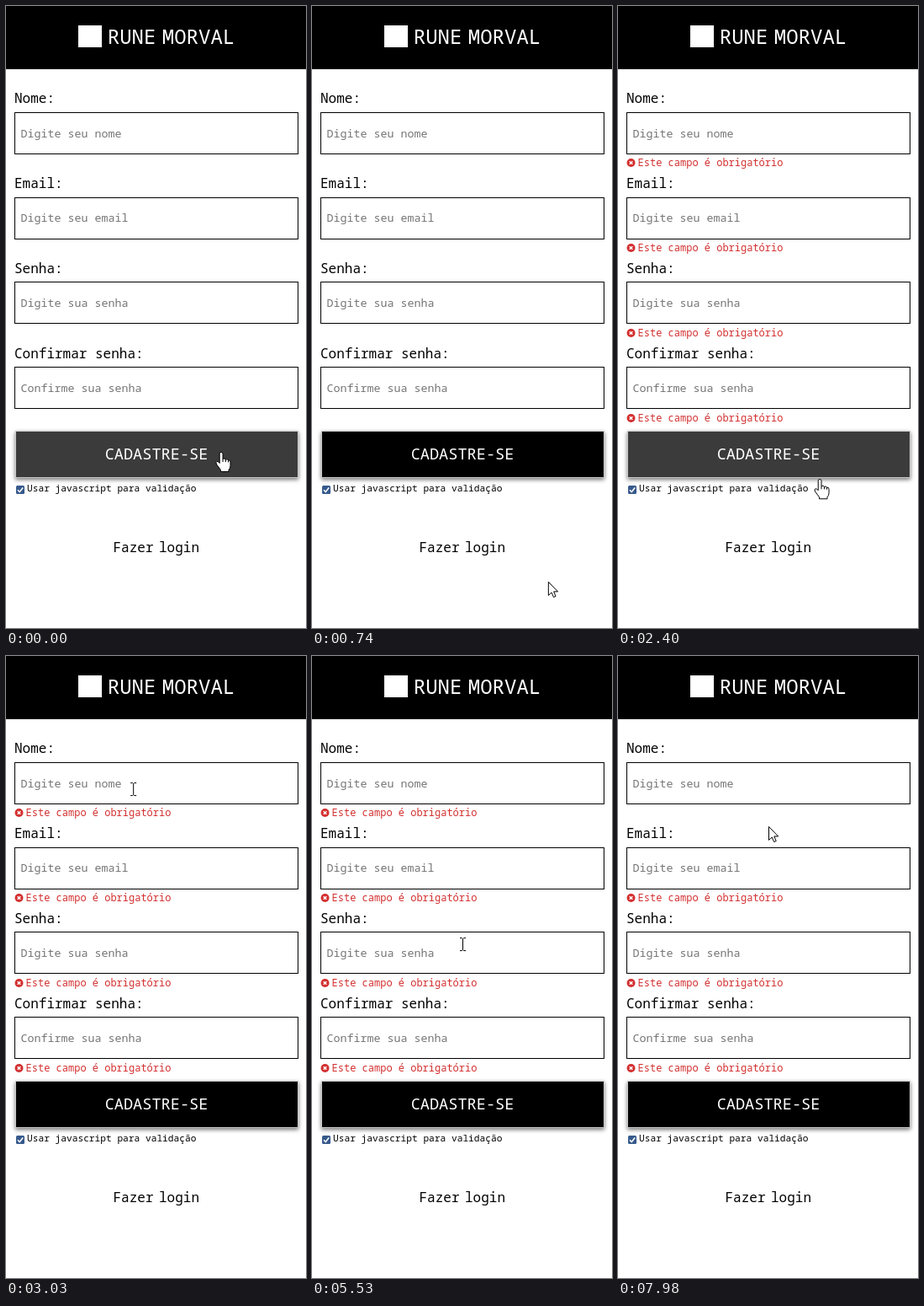
Write an HTML page that moves like this. It is 357 px wide and 738 px high and loops after 8000 ms.

```html
<!DOCTYPE html>
<html lang="pt-BR">
<head>
<meta charset="utf-8">
<title>Cadastro</title>
<style>
  html, body { margin: 0; width: 100%; height: 100%; overflow: hidden; background: #fff; }
  svg { display: block; width: 100%; height: 100%; }
  text { font: 16px "Noto Sans Mono", "DejaVu Sans Mono", monospace; white-space: pre; }
  .title { font-size: 24px; font-weight: 300; fill: #fff; }
  .hint { font-size: 13.333px; fill: #757575; }
  .error { font-size: 12px; fill: #d32f2f; }
  .action { font-size: 18.6px; fill: #fff; text-anchor: middle; }
  .small { font-size: 11.2px; }
  .box { fill: #fff; stroke: #000; }
  #button { stroke: #c8c8c8; filter: drop-shadow(0 2px 2.5px rgba(0, 0, 0, .55)); }
  #cursor path { stroke-linejoin: round; }
</style>
</head>
<body>
<svg viewBox="0 0 357 738">
  <rect width="357" height="75"/>
  <rect x="86" y="23" width="28" height="26" fill="#fff"/>
  <text class="title" x="120.8" y="45">RUNE</text>
  <text class="title" x="185.8" y="45">MORVAL</text>
  <g id="form"></g>
  <path id="caret" d="M18.5 143.5v16" stroke="#000"/>
  <rect id="button" x="11.5" y="504.5" width="336" height="55"/>
  <text class="action" x="179" y="538">CADASTRE-SE</text>
  <rect x="12" y="569" width="10" height="10" rx="1.5" fill="#375a8c"/>
  <path d="M14 574.2l2.2 2.3 4-5" fill="none" stroke="#fff" stroke-width="1.5"/>
  <text class="small" x="25" y="576">Usar javascript para validação</text>
  <text x="127.5" y="648">Fazer</text>
  <text x="182" y="648">login</text>
  <g id="cursor">
    <path id="arrow" fill="#fff" stroke="#000" d="M.5 .5V16.5L4.2 13L6.7 18.6L9.2 17.5L6.8 12H11.7Z"/>
    <g id="beam" fill="none">
      <path stroke="#fff" stroke-width="3" d="M-3.5-7.5h7M0-7.5v15M-3.5 7.5h7"/>
      <path stroke="#000" d="M-3.5-7.5h2.5l1 1 1-1h2.5M0-6.5v13M-3.5 7.5h2.5l1-1 1 1h2.5"/>
    </g>
    <path id="hand" fill="#fff" stroke="#000"
      d="M-1.8 13.5V2.2a1.9 1.9 0 0 1 3.8 0V8.5q2-1.5 3.4.6q2-1 3.1.8q2.4-.5 2.5 2V16.5q0 3-2 5V23.5H-.5V21.5L-5.3 15q-1.7-2.8.3-3.6q1.4-.3 3.2 2.1zM2 8.5v3.5M5.4 9.1v3M8.5 9.9v2.5"/>
  </g>
</svg>
<script>
const LOOP = 8000, PITCH = 100.8;
const SUBMIT = 2190, FOCUS = 7300, BLUR = 7840;
const $ = id => document.getElementById(id);

const fields = [
  ['Nome:', 'Digite seu nome'],
  ['Email:', 'Digite seu email'],
  ['Senha:', 'Digite sua senha'],
  ['Confirmar senha:', 'Confirme sua senha']
];
const fieldTop = i => Math.floor(126.3 + i * PITCH);

$('form').innerHTML = fields.map(([label, hint], i) => {
  const down = Math.ceil(i * PITCH);
  return `<text x="10" y="${115 + down}">${label}</text>
    <rect class="box" x="10.5" y="${fieldTop(i) + .5}" width="337" height="49"/>
    <text class="hint" x="17.5" y="${156 + Math.floor(i * PITCH)}">${hint}</text>
    <g class="note" transform="translate(0 ${down})">
      <circle cx="15.5" cy="186" r="5" fill="#d32f2f"/>
      <path d="M13.7 184.2l3.6 3.6m0-3.6l-3.6 3.6" stroke="#fff" stroke-width="1.5"/>
      <text class="error" x="23.6" y="190">Este campo é obrigatório</text>
    </g>`;
}).join('');
const notes = [...document.querySelectorAll('.note')];

// Turning points of the pointer: time, x, y
const route = [
  [0, 256, 529], [69, 256, 529], [200, 258, 430], [340, 340, 760],
  [600, 293, 722], [740, 281, 683], [1230, 206, 612], [1440, 236, 549],
  [1640, 234, 558], [SUBMIT, 234, 558], [2400, 240, 562], [2890, 253, 195],
  [3810, 253, 195], [3880, 256, 142], [4020, 259.5, 235], [4430, 240, 320],
  [5530, 179.5, 342], [6290, 181.5, 435], [6690, 181.5, 435],
  [7030, 184, 172], [7770, 184, 172], [7980, 179, 202], [LOOP, 179, 202]
];

// One turn around the error messages
const circle = { from: 2890, to: 3810, x: 172, y: 290, rx: 115, ry: 134 };

function pointerAt(t) {
  if (t >= circle.from && t < circle.to) {
    const turn = (t - circle.from) / (circle.to - circle.from);
    const a = -Math.PI / 4 - turn * 2 * Math.PI;
    return [circle.x + circle.rx * Math.cos(a), circle.y + circle.ry * Math.sin(a)];
  }
  const i = route.findIndex(k => k[0] > t);
  const [t0, x0, y0] = route[i - 1], [t1, x1, y1] = route[i];
  const u = (t - t0) / (t1 - t0);
  return [x0 + (x1 - x0) * u, y0 + (y1 - y0) * u];
}

const show = (el, on) => el.setAttribute('visibility', on ? 'visible' : 'hidden');

function draw(t) {
  const [x, y] = pointerAt(t);
  const hover = y > 503 && y < 566;
  const typing = fields.some((_, i) => y >= fieldTop(i) && y <= fieldTop(i) + 50);
  show($('hand'), hover);
  show($('beam'), typing);
  show($('arrow'), !hover && !typing);
  $('cursor').setAttribute('transform', `translate(${x} ${y})`);
  $('button').setAttribute('fill', hover ? '#3b3b3b' : '#000');
  notes.forEach((note, i) => show(note, t >= SUBMIT && (i > 0 || t < FOCUS)));
  show($('caret'), t >= FOCUS && t < BLUR);
}

const start = performance.now();
function tick() {
  draw(Math.max(0, performance.now() - start) % LOOP);
  requestAnimationFrame(tick);
}
draw(0);
requestAnimationFrame(tick);
</script>
</body>
</html>
```
